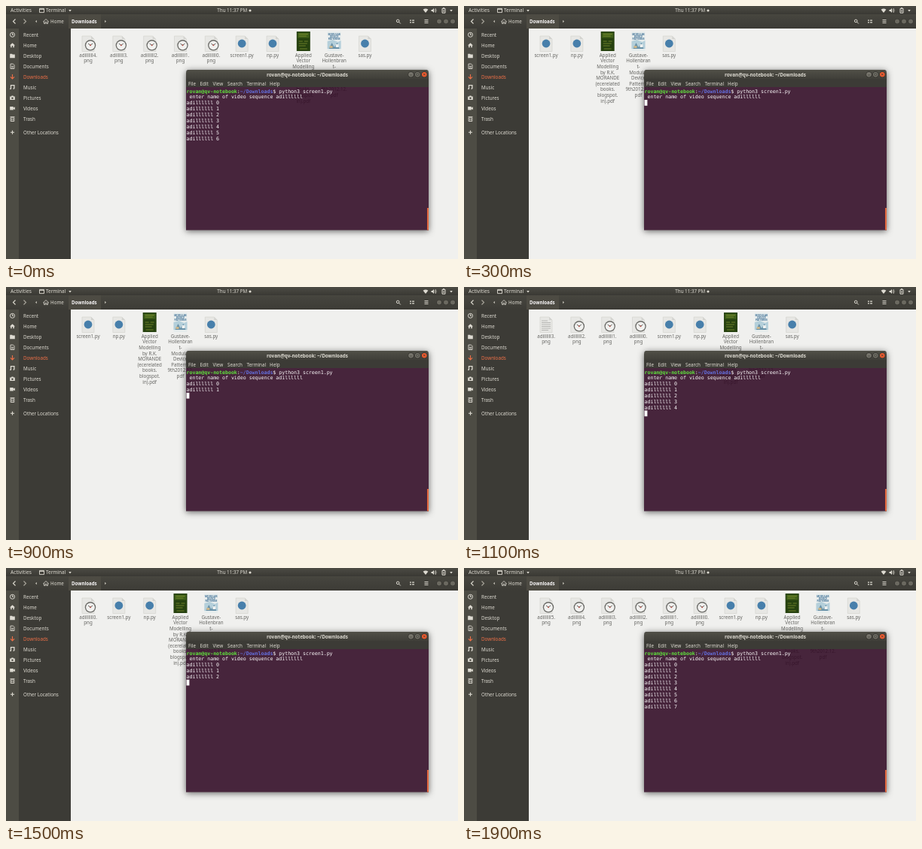
These frames come from a looping animation (600x337 px, 2.1 s). An HTML page with a canvas:

```html
<!DOCTYPE html>
<html lang="en">
<head>
<meta charset="utf-8">
<title>Terminal creating files</title>
<style>
html, body { margin: 0; width: 100%; height: 100%; overflow: hidden; background: #f0f0ee; }
canvas { display: block; }
</style>
</head>
<body>
<canvas id="stage" width="600" height="337"></canvas>
<script>
const ctx = document.getElementById('stage').getContext('2d');
const SANS = '"Noto Sans", "Open Sans", sans-serif';
const MONO = '"DejaVu Sans Mono", "Liberation Mono", monospace';
const LOOP = 2100, STEP = 200;
const COUNTS = [7, 9, 0, 1, 4, 2, 5, 10, 3, 6, 8]; // lines printed at each step
const LIGHT = '#dedbd2', WHITE = '#fbf9fa', ORANGE = '#ee7048';

const BOOK1 = ['Applied', 'Vector', 'Modelling', 'by R.K.', 'MORANDE', '(ecerelated', 'books.', 'blogspot.', 'in).pdf'];
const BOOK2 = ['Gustave-', 'Hollenbran', 't-', 'Modular', 'Device', 'Patterns', '9th2012.12.', 'pdf'];

function rect(x, y, w, h, color) {
  ctx.fillStyle = color;
  ctx.fillRect(x, y, w, h);
}

function disc(x, y, r, color) {
  ctx.fillStyle = color;
  ctx.beginPath();
  ctx.arc(x, y, r, 0, 7);
  ctx.fill();
}

function fade(y, h, top, bottom) {
  const g = ctx.createLinearGradient(0, y, 0, y + h);
  g.addColorStop(0, top);
  g.addColorStop(1, bottom);
  return g;
}

// Text is placed by its left edge (or centre) and the middle of its lowercase letters
function text(str, x, y, color = LIGHT, size = 6.25, align = 'left', font = SANS, weight = 500) {
  ctx.font = `${weight} ${size}px ${font}`;
  ctx.textAlign = align;
  ctx.fillStyle = color;
  ctx.fillText(str, x, y + 2.2);
}

function shape(d, x, y, color = LIGHT, line = 0) {
  const path = new Path2D(d);
  ctx.save();
  ctx.translate(x, y);
  if (line) {
    ctx.strokeStyle = color;
    ctx.lineWidth = line;
    ctx.stroke(path);
  } else {
    ctx.fillStyle = color;
    ctx.fill(path);
  }
  ctx.restore();
}

const RING = 'M3 0A3 3 0 1 1 -3 0A3 3 0 1 1 3 0';
const HOUSE = 'M-3.5 .3L0 -3L3.5 .3H2.4V3H.8V.8H-.8V3H-2.4V.3Z';
const DOWN = 'M-1.8 -1L1.8 -1L0 1.4Z';

function topBar() {
  rect(0, 0, 600, 11, fade(0, 11, '#4c4b44', '#3a3934'));
  text('Activities', 6, 6, LIGHT, 6.7);
  shape('M-3 -2.6H3V2.6H-3ZM-3 -1.6H3', 47.5, 6, LIGHT, .9);
  text('Terminal', 53, 6, LIGHT, 6.4);
  shape(DOWN, 85, 6);
  text('Thu 11:37 PM', 280.3, 6);
  disc(324, 6, 1.6, LIGHT);
  shape('M0 3L-3.4 -1.2Q0 -4 3.4 -1.2Z', 557, 6);
  shape('M-3 -1H-1.5L.5 -3V3L-1.5 1H-3Z', 567.5, 6);
  shape('M1.5 -1.8Q3 0 1.5 1.8M2.5 -3Q5 0 2.5 3', 567.5, 6, LIGHT, .7);
  shape('M-2 -2.6H2V3.2H-2ZM-.8 -3.5H.8M0 -1V2', 581, 6, LIGHT, 1);
  shape(DOWN, 591, 6);
}

function headerBar() {
  rect(0, 11, 600, 19, fade(11, 19, '#47463f', '#3c3b36'));
  rect(83, 11, 43, 19, '#4d4b43');
  shape('M1.5 -3L-1.5 0L1.5 3', 11, 20.5, LIGHT, 1.1);
  shape('M-1.5 -3L1.5 0L-1.5 3', 25, 20.5, '#aaa79d', 1.1);
  shape('M1 -1.7V1.7L-1.2 0Z', 40, 20.5, '#b5b2a8');
  shape(HOUSE, 53, 20.5, LIGHT, .8);
  text('Home', 59, 20.5);
  text('Downloads', 87, 20.5, WHITE, 6.1, 'left', SANS, 700);
  shape('M-1 -1.7V1.7L1.2 0Z', 132, 20.5, '#b5b2a8');
  shape('M1 -.6A1.8 1.8 0 1 1 -2.6 -.6A1.8 1.8 0 1 1 1 -.6M.5 .7L2.8 3', 521, 20.5, LIGHT, 1);
  shape('M-3 -1.4H-1M-3 1.4H-1M0 -1.4H3M0 1.4H3', 539, 20.5, LIGHT, 1.2);
  shape('M-2.5 -2H2.5M-2.5 0H2.5M-2.5 2H2.5', 558, 20.5, LIGHT, .9);
  for (const x of [575, 584, 593]) {
    disc(x, 20.5, 3.6, '#33322e');
    disc(x, 20.5, 3, '#6b6960');
  }
}

const PLACES = [
  ['Recent', 38, RING + 'M0 -2V0H1.6', 1],
  ['Home', 52, HOUSE],
  ['Desktop', 66, 'M-3.3 -2.5H-.5L.3 -1.7H3.3V3H-3.3Z'],
  ['Documents', 80, 'M-2.5 -3.2H1L2.5 -1.7V3.2H-2.5ZM-1.3 0H1.3M-1.3 1.6H1.3', .9],
  ['Downloads', 94, 'M0 -3.3V2.6M-2.6 0L0 2.7L2.6 0', 1.1],
  ['Music', 108, 'M-2 2V-2.6H2.4V1.6M-3.3 2H-1.6M1 1.8H2.6', 1.3],
  ['Pictures', 122, 'M-3.3 -1.7H-1.5L-1 -2.8H1L1.5 -1.7H3.3V2.6H-3.3ZM1.3 .4A1.3 1.3 0 1 0 -1.3 .4A1.3 1.3 0 1 0 1.3 .4'],
  ['Videos', 136, 'M-3.3 -2.2H1.3V-.6L3.4 -2V2L1.3 .6V2.2H-3.3Z'],
  ['Trash', 150, 'M-2.3 -1.5H2.3V3.2H-2.3ZM-3 -2.6H3M-.8 0V2M.8 0V2', .9],
  ['Other Locations', 168, 'M-2.5 0H2.5M0 -2.5V2.5', 1.1]
];

function sideBar() {
  rect(0, 30, 17, 307, '#4d4c44');
  rect(17, 30, 69, 307, '#3c3b36');
  for (const [name, y, icon, line] of PLACES) {
    const color = name === 'Downloads' ? ORANGE : LIGHT;
    shape(icon, 8.5, y + .3, color, line);
    text(name, 23, y + .3, color);
  }
}

function paper(x, y) {
  const page = 'M-8 -11H4L8 -7V9.5H-8Z';
  shape(page, x, y, '#e7e7e4');
  shape(page, x, y, '#d0d0cc', .6);
  shape('M4 -11V-7H8Z', x, y, '#d3d3cf');
}

const ICONS = {
  page(x, y) {
    paper(x, y);
    shape('M-6 -6H2M-6 -3.5H6M-6 -1H6M-6 1.5H6M-6 4H6M-6 6.5H3', x, y, '#b2b2ae', .9);
  },
  clock(x, y) {
    paper(x, y);
    disc(x + 3, y + 1.3, 7.2, '#6a6a66');
    disc(x + 3, y + 1.3, 5.9, '#f1f1ef');
    shape('M-3 -2.3L0 0L3 -2.3', x + 3, y + 1.3, '#4c4c48', .9);
    disc(x + 3, y + 1.3, 1, '#b8544a');
  },
  script(x, y) {
    paper(x, y);
    disc(x, y - 1, 5.4, '#477fab');
  },
  green(x, y) {
    rect(x - 9, y - 17, 18, 26, '#26410f');
    rect(x - 7.5, y - 15.5, 15, 7, '#40601a');
    shape('M-6 -13.5H6M-6 -11H4M-6 -4H-1M1 -4H6M-6 -1H5M-6 2H3M-5 6H5', x, y, '#7f9130', .8);
  },
  blue(x, y) {
    rect(x - 9, y - 17, 18, 26, '#e6ecec');
    for (const [i, word] of ['MODULAR', 'DEVICE', 'PATTERNS'].entries())
      text(word, x, y - 14.6 + i * 3.4, '#3b6c92', 3.2, 'center', SANS, 700);
    shape('M-9 -4L-2 -6L5 -3L9 -5V6H-9Z', x, y, '#b4cfda');
    shape('M-7 6L-3 -2L0 4L4 -2L7 6Z', x, y, '#6891a8');
    rect(x - 6, y + 2, 4, 3, '#cbb68c');
    rect(x + 2, y, 4, 4, '#eef1f0');
  }
};

function fileList(count) {
  const pending = count === 5;
  const total = Math.max(0, count - (pending ? 1 : 2));
  const files = [];
  for (let i = total - 1; i >= 0; i--)
    files.push([pending && i === total - 1 ? 'page' : 'clock', [`adillllll${i}.`, 'png']]);
  const wrapped = total > 7;
  files.push(
    ['script', ['screen1.py']],
    ['script', ['np.py']],
    ['green', wrapped ? ['Applied', 'Vector', 'Modelli…'] : BOOK1],
    ['blue', wrapped ? ['Gustave-', 'Hollenbran', 't-Modula…'] : BOOK2],
    ['script', ['sas.py']]
  );
  files.forEach(([icon, label], i) => {
    const x = 109 + i % 12 * 40.83, y = Math.floor(i / 12) * 47;
    ICONS[icon](x, 51 + y);
    label.forEach((line, row) => text(line, x, 65.5 + y + row * 7.6, '#656562', 6.2, 'center', SANS, 400));
  });
}

function terminal(count) {
  // Shadow falls outside the window only, since its body is translucent
  ctx.save();
  ctx.beginPath();
  ctx.rect(0, 0, 600, 337);
  ctx.rect(239, 87, 322, 211.5);
  ctx.clip('evenodd');
  ctx.shadowColor = 'rgba(0,0,0,.6)';
  ctx.shadowBlur = 8;
  ctx.shadowOffsetY = 1.5;
  ctx.fillStyle = '#3c3b36';
  ctx.beginPath();
  ctx.roundRect(239, 85, 322, 213.5, [4, 4, 0, 0]);
  ctx.fill();
  ctx.restore();

  ctx.fillStyle = fade(85, 12, '#504f47', '#403f39');
  ctx.beginPath();
  ctx.roundRect(239, 85, 322, 12.5, [4, 4, 0, 0]);
  ctx.fill();
  text('rovan@qv-notebook: ~/Downloads', 400, 91.3, LIGHT, 6.3, 'center', SANS, 700);
  for (const [x, color] of [[537.5, '#77756c'], [546.3, '#77756c'], [555.3, '#ee5c30']]) {
    disc(x, 91.2, 3.9, '#302f2b');
    disc(x, 91.2, 3.3, color);
  }
  shape('M-1.5 .8H1.5M7.3 -1.3H10.3V1.3H7.3ZM16.5 -1.3L19.1 1.3M19.1 -1.3L16.5 1.3', 537.5, 91.2, '#3c3b36', .7);

  rect(239, 97, 322, 11, '#3c3b36');
  const menu = { File: 242, Edit: 257.5, View: 274.5, Search: 294, Terminal: 319.5, Help: 350 };
  for (const name in menu) text(name, menu[name], 103.5);
  rect(239, 108, 322, 190.5, 'rgba(48,10,36,.88)');
  rect(559, 269, 2, 29.5, '#e2683f');

  const mono = (str, col, row, color = WHITE, weight = 400) =>
    text(str, 239.5 + col * 3.96, 113.3 + row * 7.9, color, 6.58, 'left', MONO, weight);
  mono('rovan@qv-notebook', 0, 0, '#5fe23c', 700);
  mono(':', 17, 0);
  mono('~/Downloads', 18, 0, '#6470e0', 700);
  mono('$ python3 screen1.py', 29, 0);
  mono(' enter name of video sequence adillllll', 0, 1);
  for (let i = 0; i < count; i++) mono('adillllll ' + i, 0, i + 2);
  if (count < 6) rect(239.5, 125 + count * 7.9, 3.9, 7.8, WHITE);
}

function draw() {
  const time = performance.now() % LOOP;
  const count = COUNTS[Math.floor((time + STEP / 2) / STEP) % COUNTS.length];
  rect(0, 0, 600, 337, '#f0f0ee');
  topBar();
  headerBar();
  sideBar();
  fileList(count);
  terminal(count);
  requestAnimationFrame(draw);
}
draw();
</script>
</body>
</html>
```
